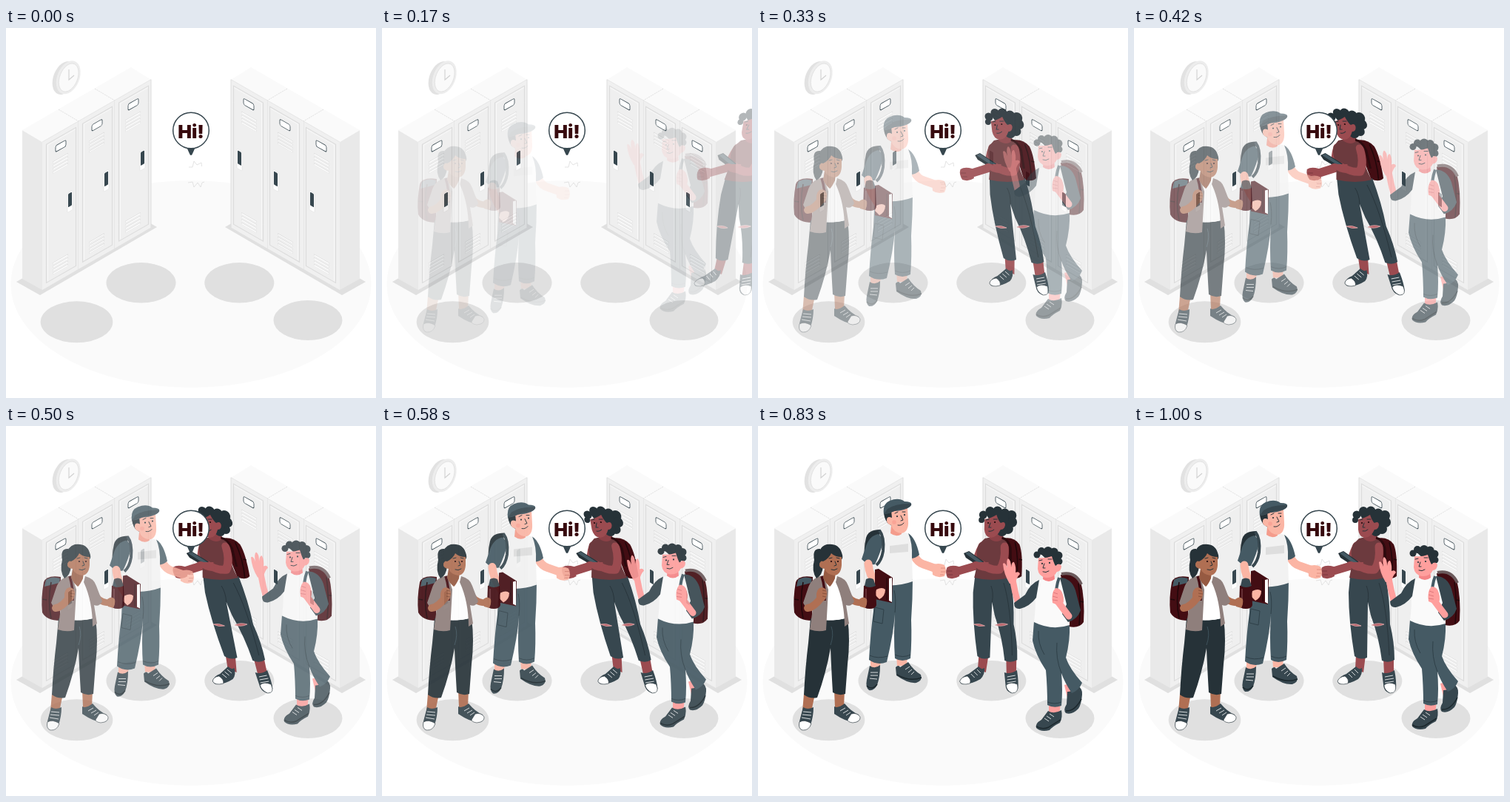
An HTML page that plays this animation: 500 by 500 pixels, repeating every 1.04 s.

```html
<!DOCTYPE html>
<html lang="en">
<head>
<meta charset="utf-8">
<title>Meeting at the lockers</title>
<style>
html, body { margin: 0; width: 100%; height: 100%; overflow: hidden; background: #fff; }
svg { display: block; width: 100vw; height: 100vh; }
text { font: 900 25px Inter, "Open Sans", sans-serif; }
.limb { fill: none; stroke-linecap: round; stroke-linejoin: round; }
.ink { fill: none; stroke: #263238; stroke-width: 1; stroke-linecap: round; }
.lace { fill: none; stroke: #fff; stroke-width: .8; }
</style>
</head>
<body>
<svg viewBox="0 0 500 500">
  <defs>
    <g id="vent" fill="none">
      <path d="M14 0h21M14 4.5h21M14 9h21M14 13.5h21" stroke="#dcdcdc" stroke-width="2.4"/>
      <path d="M14.5 .3h20M14.5 4.8h20M14.5 9.3h20M14.5 13.8h20" stroke="#fff" stroke-width="1.4"/>
    </g>
    <g id="door">
      <path d="M0 0H49V200H0Z" fill="#f0f0f0"/>
      <path d="M49 0V200" stroke="#dedede"/>
      <rect x="5.5" y="6.5" width="40" height="187" fill="#efefef" stroke="#dcdcdc" stroke-width="1.2"/>
      <path d="M7.5 192V8.5H45" fill="none" stroke="#f8f8f8"/>
      <rect x="18" y="15.5" width="14" height="8.5" rx="2" fill="#fff" stroke="#37474f" stroke-width=".8"/>
      <use href="#vent" y="36"/>
      <use href="#vent" y="172.5"/>
      <rect x="34" y="89" width="7" height="26" rx="1" fill="#fff" stroke="#e0e0e0" stroke-width=".5"/>
      <rect x="35" y="90.5" width="5" height="18" rx="1" fill="#37474f"/>
    </g>
    <g id="lockers">
      <path d="M14 343L46 361L204 269L190 261L40 328Z" fill="#e0e0e0"/>
      <path d="M22 138L49 154V354L22 339Z" fill="#e9e9e9"/>
      <path d="M22 138L169 53L196 70L49 154Z" fill="#fafafa"/>
      <path d="M71 110L98 126M120 82L147 98" stroke="#d8d8d8" stroke-width=".8" stroke-dasharray="2 1"/>
      <g transform="matrix(1 -.574 0 1 49 154)">
        <use href="#door"/><use href="#door" x="49"/><use href="#door" x="98"/>
        <path d="M0 0H147" stroke="#e2e2e2" stroke-width=".7"/>
      </g>
    </g>
  </defs>

  <ellipse cx="250" cy="346" rx="243.5" ry="140" fill="#fafafa"/>
  <use href="#lockers"/>
  <use href="#lockers" transform="matrix(-1 0 0 1 500 0)"/>
  <g fill="#e0e0e0">
    <ellipse cx="95.5" cy="397.3" rx="48.8" ry="28"/>
    <ellipse cx="182.5" cy="344.3" rx="47" ry="27.2"/>
    <ellipse cx="315.3" cy="344.3" rx="47" ry="27.2"/>
    <ellipse cx="408" cy="395" rx="46.5" ry="27"/>
  </g>

  <!-- wall clock -->
  <g transform="rotate(22 82 67)">
    <ellipse cx="79.5" cy="68.5" rx="15" ry="23.5" fill="#e2e2e2"/>
    <ellipse cx="84" cy="66" rx="15" ry="23.5" fill="#ededed"/>
    <ellipse cx="84.5" cy="66" rx="12" ry="20" fill="#fafafa" stroke="#e0e0e0" stroke-width=".8"/>
  </g>
  <path d="M85 56V70L92 64" fill="none" stroke="#d0d0d0" stroke-width="1.1"/>
  <path d="M247 188l5 0 2-8 4 5 6-3 .5 5M246 209l6-1 2 7 5-6 4 6 2-6 3-1" fill="none" stroke="#dcdcdc" stroke-width=".8"/>

  <!-- woman with tablet -->
  <g id="walker" opacity="0">
    <path d="M328 152Q343 149 351 160Q356 172 355 203Q348 209 338 204Z" fill="#430d13"/>
    <path d="M345 157Q351 180 348 205M351 180l4 1" fill="none" stroke="#20070a" stroke-width="1.5"/>
    <path d="M300 309L299 328L310 333L313 310ZM337 314L338 335L351 334L351 314Z" fill="#9b4b50"/>
    <path d="M275 345Q278 338 287 335L300 325Q304 330 308 327Q309 336 303 342Q291 349 280 349Q276 349 275 345Z" fill="#37474f"/>
    <path d="M275 345Q277 339 285 338Q291 342 289 348Q277 351 275 345Z" fill="#fff" stroke="#263238" stroke-width=".6"/>
    <path d="M335 333Q343 336 352 330Q355 346 354 355Q351 361 345 361Q337 358 337 349Z" fill="#37474f"/>
    <path d="M338 350Q344 345 353 349Q356 361 346 361Q338 357 338 350Z" fill="#fff" stroke="#263238" stroke-width=".6"/>
    <path class="lace" d="M290 335l5 5M294 332l5 5M298 329l5 5M339 339l11-2M339 343l12-2M339 347l12-2"/>
    <path d="M292 203Q316 209 340 203Q346 236 346 268Q352 292 352 316Q344 321 335 317Q331 285 320 256L316 238L315 313Q306 317 298 311Q290 263 290 225Z" fill="#37474f"/>
    <path d="M316 238Q318 225 314 216M331 212Q342 245 345 310" fill="none" stroke="#263238" stroke-width=".8"/>
    <path d="M292 268Q300 266 307 270Q299 272 292 268ZM321 269Q329 265 338 268Q329 272 321 269Z" fill="#b9636a" stroke="#e5b3b3" stroke-width=".7"/>
    <path class="limb" d="M301 162Q294 176 293 189L266 197" stroke="#9b4b50" stroke-width="11"/>
    <path d="M270 190Q260 187 254 191Q251 198 255 205Q263 208 271 203Z" fill="#9b4b50"/>
    <path d="M254 196h7M255 201h7" stroke="#74343a" stroke-width=".8"/>
    <path d="M304 152Q318 148 332 152Q339 167 334 183Q334 194 339 205Q316 211 291 205Q293 193 296 184Q291 171 296 160Z" fill="#6c3a3e"/>
    <path d="M313 143L328 143L329 152Q320 160 310 152Z" fill="#8b4147"/>
    <g fill="#263238">
      <circle cx="301" cy="120" r="5.5"/><circle cx="310" cy="115" r="6"/><circle cx="320" cy="115" r="6.5"/>
      <circle cx="330" cy="118" r="6.5"/><circle cx="339" cy="121" r="7"/><circle cx="340" cy="130" r="7"/>
      <circle cx="335" cy="139" r="7"/><circle cx="327" cy="142" r="7"/><circle cx="299" cy="127" r="4"/>
      <path d="M303 116H335V144H320Z"/>
    </g>
    <path d="M303 126Q311 125 319 120Q322 129 325 131Q331 128 331 134Q330 140 325 140Q320 151 312 151Q304 150 303 140Z" fill="#9b4b50"/>
    <circle cx="308" cy="131" r="1.1" fill="#20070a"/><circle cx="317" cy="130" r="1.1" fill="#20070a"/>
    <path class="ink" d="M305 127l4-1M315 126l5 0M311 131l-2 6 3 0M309 142q4 1 7-2"/>
    <path class="limb" d="M331 163Q333 183 325 194Q315 196 300 187" stroke="#9b4b50" stroke-width="11"/>
    <path d="M327 151Q336 153 339 165L340 190" fill="none" stroke="#2c0a0e" stroke-width="3"/>
    <path d="M276 172L283 169L303 183L306 189L299 191L279 178Z" fill="#263238"/>
    <path d="M278 172L283 170L302 184L300 188Z" fill="#455a64"/>
    <path d="M287 186Q290 181 297 184L310 184L309 196Q294 196 287 186Z" fill="#9b4b50"/>
  </g>

  <!-- boy with cap -->
  <g class="fade" data-rise="30">
    <path d="M165 142Q149 142 146 153Q142 169 145 187L162 181Z" fill="#263238"/>
    <path d="M152 315L152 331L163 332L168 315ZM187 312L188 326L201 326L202 312Z" fill="#fbb5a4"/>
    <path d="M151 326Q158 331 165 325Q165 341 161 352Q157 360 150 359Q145 355 147 345Z" fill="#37474f"/>
    <path d="M186 328Q190 324 192 328L203 321Q210 332 220 338Q223 346 214 349Q202 350 187 339Z" fill="#37474f"/>
    <path d="M147 353Q154 360 161 351M188 338Q205 348 221 342" fill="none" stroke="#1c282d" stroke-width="1.5"/>
    <path class="lace" d="M152 335l10 0M152 339l10 0M151 343l10 1M199 331l6-4M203 335l5-4M207 338l4-4"/>
    <path d="M158 212Q185 218 209 209Q209 236 207 264Q208 292 206 316Q195 322 185 316Q183 286 185 256Q183 283 174 321Q161 326 150 318Q152 281 156 252Z" fill="#455a64"/>
    <path d="M151 312Q162 317 175 313M185 311Q196 316 206 311M185 254Q187 235 184 224M158 247L170 250L168 269L156 266Z" fill="none" stroke="#2f4048"/>
    <path class="limb" d="M211 177Q216 187 224 189L244 196" stroke="#fbb5a4" stroke-width="11"/>
    <path d="M235 190Q244 186 252 190Q256 198 252 205Q243 208 236 203Z" fill="#fbb5a4"/>
    <path d="M247 194h6M247 199h6M246 203h5" stroke="#d88478" stroke-width=".8"/>
    <path d="M203 147Q213 153 218 176Q213 181 206 181Z" fill="#455a64"/>
    <path d="M166 148Q186 141 203 147Q209 160 208 180L209 212Q185 221 157 215Q160 184 158 163Z" fill="#f2f2f2"/>
    <path d="M178 164L203 161L203 172L178 174Z" fill="#dedede"/>
    <path d="M163 148Q150 150 145 167L140 182Q148 190 158 189Q165 175 170 156Z" fill="#455a64"/>
    <path d="M164 143Q171 152 169 171Q167 184 160 190" fill="none" stroke="#37474f" stroke-width="4"/>
    <path class="limb" d="M149 188Q150 203 162 220" stroke="#fbb5a4" stroke-width="11"/>
    <path d="M158 196L163 195L182 207L181 241L158 236Z" fill="#430d13"/>
    <path d="M177 208L181 207L181 240L177 238Z" fill="#fff"/>
    <path d="M174 207V237" stroke="#20070a"/>
    <path d="M160 223Q168 219 172 223Q172 232 164 236L158 230Z" fill="#fbb5a4"/>
    <path d="M180 137L194 139L194 148Q187 153 179 147Z" fill="#f49c8c"/>
    <path d="M170 118Q170 126 175 133L181 137L183 120L179 112Z" fill="#263238"/>
    <path d="M180 116L202 112L203 130Q204 145 194 147Q183 146 180 136Q173 134 174 128Q175 123 181 126Z" fill="#fbb5a4"/>
    <path d="M170 121Q168 107 178 103Q190 98 198 104Q209 104 207 109Q202 116 184 117Q176 121 170 121Z" fill="#455a64"/>
    <path d="M175 114Q187 106 207 107Q208 113 190 115Q177 120 170 121Z" fill="#37474f"/>
    <circle cx="188" cy="124" r="1.1" fill="#263238"/><circle cx="198" cy="122" r="1.1" fill="#263238"/>
    <path class="ink" d="M185 120l4-2M195 118l4 0M193 123l3 6-3 1M189 136q5 1 8-3"/>
    <circle cx="184" cy="132" r="2.8" fill="#f89d90" opacity=".7"/>
  </g>

  <!-- waving boy -->
  <g class="fade" data-rise="-30">
    <path d="M409 199Q429 196 436 208Q442 231 440 263Q434 272 420 269Z" fill="#430d13"/>
    <path d="M410 198Q429 194 437 212" fill="none" stroke="#6b5a5c" stroke-width="4"/>
    <path d="M433 211Q437 239 434 267M436 235l4 1" fill="none" stroke="#20070a" stroke-width="1.5"/>
    <path d="M393 370L393 391L407 391L409 371ZM414 348L418 365L430 360L428 344Z" fill="#ff9f9d"/>
    <path d="M418 357Q425 358 431 348Q439 353 438 361Q437 374 433 380Q424 389 416 386Q412 382 417 374Z" fill="#37474f"/>
    <path d="M392 383Q400 388 410 382Q412 391 408 399Q398 404 394 409Q382 412 376 406Q374 400 383 395Z" fill="#37474f"/>
    <path d="M376 404Q384 409 393 405L409 395M416 383Q428 384 437 367" fill="none" stroke="#1c282d" stroke-width="1.5"/>
    <path class="lace" d="M387 393l6 4M390 390l6 4M394 387l6 4"/>
    <path d="M373 262Q398 271 421 266Q422 288 416 311Q421 326 438 345Q434 355 424 359Q414 344 410 332Q412 355 410 376Q400 380 391 375Q391 350 389 328Q375 307 371 288Z" fill="#455a64"/>
    <path d="M410 332Q402 312 404 291M379 275Q378 292 387 307M391 371Q401 375 410 371" fill="none" stroke="#2f4048"/>
    <path class="limb" d="M352 240Q347 222 344 205" stroke="#ff9f9d" stroke-width="8.5"/>
    <path d="M340 211Q332 198 331 184Q334 181 337 190Q335 179 338 177Q342 179 342 189Q343 181 346 182Q349 188 348 196Q353 194 354 198Q349 203 348 211Z" fill="#ff9f9d"/>
    <path d="M377 208Q387 203 407 204Q419 207 421 222L421 267Q397 275 373 263Q376 239 374 226Z" fill="#fafafa"/>
    <path d="M380 206Q368 211 361 226L346 237Q346 246 354 245Q367 242 376 230Z" fill="#37474f"/>
    <path d="M408 203Q423 203 429 220L436 247Q432 259 419 263L411 252L417 239Z" fill="#37474f"/>
    <path class="limb" d="M420 255L405 235" stroke="#ff9f9d" stroke-width="9"/>
    <path d="M407 203Q402 216 403 232" fill="none" stroke="#455a64" stroke-width="4"/>
    <path d="M398 237Q396 223 402 217Q410 217 412 226Q415 235 410 242Z" fill="#ff9f9d"/>
    <path d="M399 223l6 2M398 228l7 2M398 233l7 1" stroke="#d66f74" stroke-width=".8"/>
    <path d="M386 194L400 193L401 205Q393 211 385 205Z" fill="#f58587"/>
    <g fill="#263238">
      <circle cx="377" cy="172" r="4.5"/><circle cx="383" cy="167" r="5"/><circle cx="392" cy="167" r="6"/>
      <circle cx="400" cy="168" r="5.5"/><circle cx="406" cy="173" r="5.5"/><circle cx="407" cy="181" r="4.5"/>
      <path d="M379 168H404V194L392 180Z"/>
    </g>
    <path d="M379 176Q389 177 397 174Q400 184 402 187Q407 182 410 187Q410 194 404 195Q399 204 389 203Q379 201 378 191Z" fill="#ff9f9d"/>
    <circle cx="384" cy="184" r="1.1" fill="#263238"/><circle cx="394" cy="183" r="1.1" fill="#263238"/>
    <path class="ink" d="M380 180l4-1M392 178l5 0M387 184l-2 6 3 0M385 195q4 2 8-1"/>
  </g>

  <!-- girl with bottle -->
  <g class="fade" data-rise="0">
    <path d="M74 204Q55 201 51 211Q47 233 49 252Q55 263 73 263Z" fill="#430d13"/>
    <path d="M54 208Q62 202 73 206L72 212L52 217Z" fill="#455a64"/>
    <path d="M61 211Q56 236 61 260M49 234l6 1" fill="none" stroke="#20070a" stroke-width="1.5"/>
    <path d="M62 362L60 386L72 386L77 362ZM103 357L104 380L116 380L117 357Z" fill="#b06f53"/>
    <path d="M61 380Q67 384 75 380Q75 392 71 404Q68 411 60 411Q54 409 56 399Z" fill="#37474f"/>
    <path d="M56 400Q63 396 72 402Q69 412 60 411Q54 409 56 400Z" fill="#fff" stroke="#263238" stroke-width=".6"/>
    <path d="M103 379Q108 382 117 375Q126 386 136 390Q140 397 134 400Q122 402 103 389Z" fill="#37474f"/>
    <path d="M126 389Q134 387 138 393Q139 400 128 401Q121 400 121 397Z" fill="#fff" stroke="#263238" stroke-width=".6"/>
    <path class="lace" d="M61 386l11 1M60 390l12 1M59 394l12 2M111 385l7-4M115 388l7-4M119 391l6-4"/>
    <path d="M71 260Q98 266 121 259Q125 290 121 322L118 362Q109 365 101 360Q99 326 98 300Q92 334 80 367Q70 369 62 363Q64 325 68 293Z" fill="#263238"/>
    <path d="M98 296Q103 282 99 271" fill="none" stroke="#455a64" stroke-width=".8"/>
    <path d="M86 205Q99 200 114 207L117 260Q104 264 88 261Z" fill="#fff"/>
    <path class="limb" d="M122 230Q128 240 145 239" stroke="#b06f53" stroke-width="9"/>
    <path d="M89 202Q73 204 68 218L61 239Q65 248 74 247L70 275Q82 279 92 276L95 221Z" fill="#8f7f7c"/>
    <path d="M107 203Q119 206 122 216L130 237Q126 245 119 242L123 267L117 271Q117 237 105 211Z" fill="#8f7f7c"/>
    <path d="M86 203Q91 218 90 236" fill="none" stroke="#430d13" stroke-width="3.5"/>
    <path class="limb" d="M67 246Q76 245 86 231" stroke="#b06f53" stroke-width="10"/>
    <path d="M79 231Q78 220 86 218Q94 219 93 228Q92 236 85 238Z" fill="#b06f53"/>
    <path d="M87 222l5 1M87 226l6 1M87 230l5 1" stroke="#7d4a36" stroke-width=".8"/>
    <path d="M90 193L105 195L104 206Q100 215 97 217Q91 212 88 205Z" fill="#965a42"/>
    <path d="M84 166Q73 165 76 181Q72 196 79 206Q87 202 88 189Z" fill="#263238"/>
    <path d="M83 184Q79 164 93 160Q109 158 113 171Q116 179 112 181L91 190Z" fill="#263238"/>
    <path d="M88 183Q96 179 99 172Q104 177 113 177L113 188Q112 201 103 202Q92 200 90 193Q82 192 83 186Q85 181 88 183Z" fill="#b06f53"/>
    <circle cx="99" cy="183" r="1.1" fill="#20070a"/><circle cx="108" cy="183" r="1.1" fill="#20070a"/>
    <path class="ink" d="M96 179l4-1M106 178l4 1M104 183l2 5-3 1M99 194q4 2 8-1"/>
    <path d="M143 216Q151 212 159 216L160 242Q159 247 151 247Q143 247 142 242Z" fill="#430d13"/>
    <path d="M144 216L146 207Q151 204 156 207L159 216Q151 220 144 216Z" fill="#37474f"/>
    <path d="M146 220V242" stroke="#703a40" stroke-width="1.5"/>
    <path d="M137 234Q143 229 147 234Q148 240 145 246L138 244Z" fill="#b06f53"/>
  </g>

  <!-- speech bubble -->
  <path d="M244 161H256L251.5 171Q250 173 248.5 171Z" fill="#37474f"/>
  <circle cx="250" cy="138.5" r="24.3" fill="#fff" stroke="#37474f" stroke-width="1.5"/>
  <text x="250" y="149" text-anchor="middle" fill="#370a0e">Hi!</text>
</svg>
<script>
const LOOP = 1040, FPS = 24, LEAD = 0.02;
const walker = document.getElementById("walker");
const faders = document.querySelectorAll(".fade");
const tan = deg => Math.tan(deg * Math.PI / 180);
const clamp = v => Math.min(1, Math.max(0, v));
const mix = (a, b, p) => a + (b - a) * p;

// time, shift, lean, opacity
const keys = [
  [0, 250, tan(-20), 0],
  [0.6, 0, tan(10), 1],
  [0.8, 0, tan(-2), 1],
  [1, 0, 0, 1]
];

const bezier = (a, b, s) => 3 * a * s * (1 - s) ** 2 + 3 * b * s * s * (1 - s) + s ** 3;

// cubic-bezier(.36, -.01, .5, 1.38), solved by bisection
function ease(x) {
  if (x <= 0 || x >= 1) return clamp(x);
  let lo = 0, hi = 1;
  for (let i = 0; i < 24; i++) {
    const mid = (lo + hi) / 2;
    if (bezier(0.36, 0.5, mid) < x) lo = mid; else hi = mid;
  }
  return bezier(-0.01, 1.38, lo);
}

function place(el, opacity, lean, x, y) {
  el.setAttribute("opacity", clamp(opacity));
  el.setAttribute("transform", `matrix(1 0 ${lean} 1 ${x - 250 * lean} ${y})`);
}

function draw(ms) {
  const step = Math.floor((ms % LOOP + 5) * FPS / 1000);
  const t = step ? clamp(step / FPS + LEAD) : 0;
  const i = t < 0.6 ? 0 : t < 0.8 ? 1 : 2;
  const [from, to] = [keys[i], keys[i + 1]];
  const p = ease((t - from[0]) / (to[0] - from[0]));
  const [, shift, lean, alpha] = from.map((v, n) => mix(v, to[n], p));
  place(walker, alpha, lean, shift, 0);
  const q = ease(t);
  for (const f of faders) place(f, q, 0, 0, f.dataset.rise * (1 - q));
}

const start = performance.now();
function tick() {
  draw(performance.now() - start);
  requestAnimationFrame(tick);
}
tick();
</script>
</body>
</html>
```
